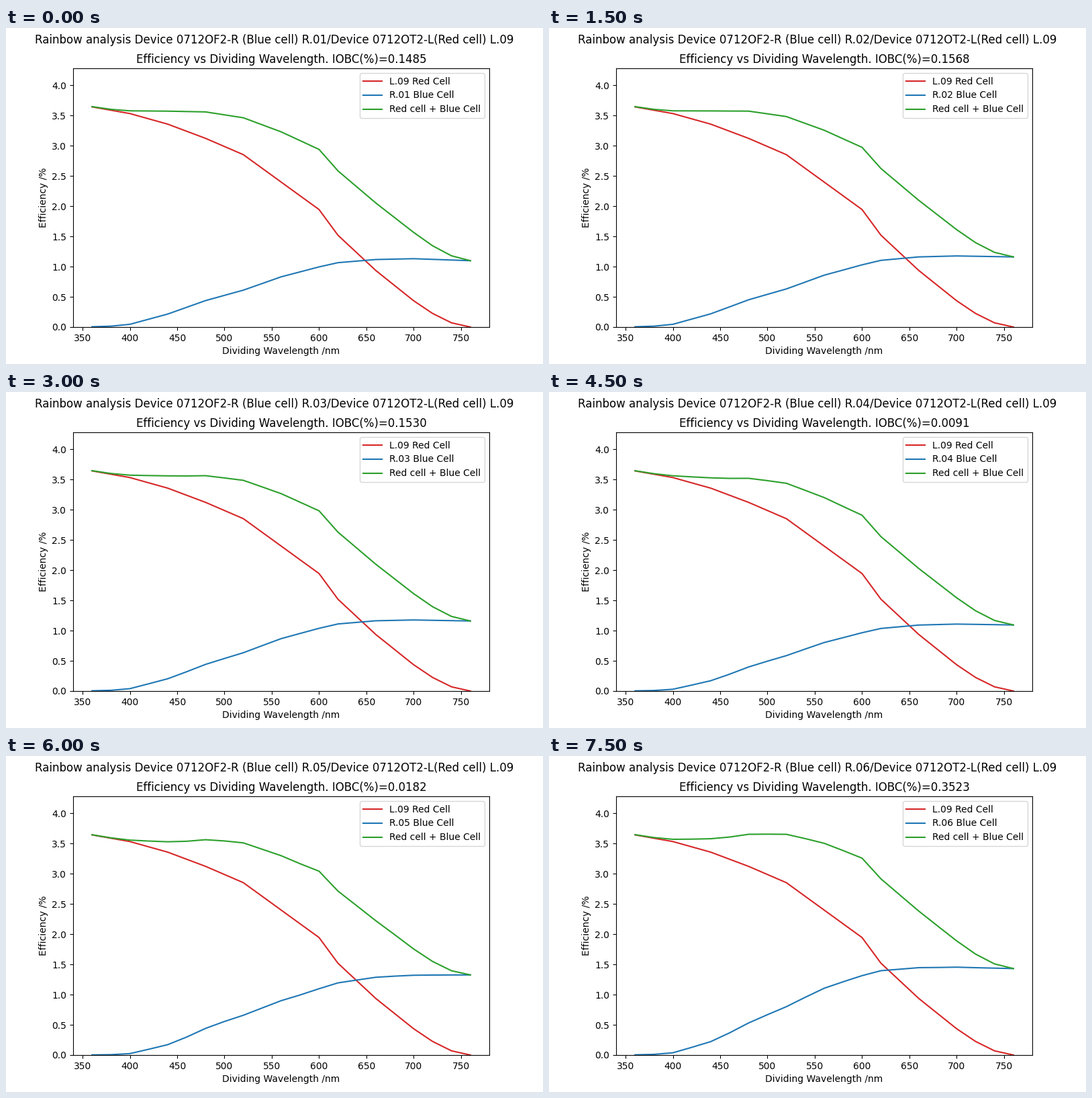
A matplotlib script that plays this animation: 800x500 px, repeating every 8000 ms.

```python
import numpy as np
import matplotlib.pyplot as plt
from matplotlib.animation import FuncAnimation

plt.rcParams["font.family"] = "DejaVu Sans"

STEP_MS = 500
FRAMES = 16
HOLD = 3  # frames each cell stays on screen

wavelength = np.arange(360, 761, 20)


def through(*points):
    """Straight segments through a few (wavelength, value) points."""
    return np.interp(wavelength, *zip(*points))


def bump(centre, width):
    return np.exp(-((wavelength - centre) / width) ** 2 / 2)


red = through((360, 3.64), (400, 3.53), (440, 3.355), (480, 3.12), (520, 2.85),
              (600, 1.943), (620, 1.518), (660, 0.935), (700, 0.435),
              (720, 0.225), (740, 0.07), (760, 0))

# Blue response relative to its peak
rise = through((360, 0.004), (380, 0.013), (400, 0.04), (440, 0.19), (480, 0.387),
               (520, 0.54), (560, 0.735), (600, 0.88), (620, 0.942),
               (660, 0.988), (700, 1), (760, 0.986))
early = bump(450, 35)
middle = bump(575, 55)
tail = through((700, 0), (760, 1))

# IOBC, peak efficiency, then weights of the early, middle and tail parts
cells = [
    (0.1485, 1.130, 0, 0, -0.015),
    (0.1568, 1.176, -0.004, -0.006, 0),
    (0.1530, 1.175, -0.018, 0.003, 0),
    (0.0091, 1.108, -0.037, -0.011, 0),
    (0.0182, 1.325, -0.060, -0.058, 0.014),
    (0.3523, 1.450, -0.040, 0.028, 0),
]


def blue_curve(peak, a, b, c):
    return peak * np.maximum(rise + a * early + b * middle + c * tail, 0)


fig, ax = plt.subplots(figsize=(8, 5), dpi=100)


def draw(frame):
    index = frame // HOLD
    iobc, *shape = cells[index]
    blue = blue_curve(*shape)
    name = f"R.{index + 1:02d}"

    ax.clear()
    ax.plot(wavelength, red, color="tab:red", label="L.09 Red Cell")
    ax.plot(wavelength, blue, color="tab:blue", label=f"{name} Blue Cell")
    ax.plot(wavelength, red + blue, color="tab:green", label="Red cell + Blue Cell")
    ax.set_xlim(340, 780)
    ax.set_ylim(0, 4.278)
    ax.set_xlabel("Dividing Wavelength /nm")
    ax.set_ylabel("Efficiency /%")
    ax.set_title(f"Efficiency vs Dividing Wavelength. IOBC(%)={iobc:.4f}")
    ax.legend(loc="upper right")
    fig.suptitle(f"Rainbow analysis Device 0712OF2-R (Blue cell) {name}"
                 "/Device 0712OT2-L(Red cell) L.09", y=0.982)
    return []


anim = FuncAnimation(fig, draw, frames=FRAMES, init_func=lambda: draw(0),
                     interval=STEP_MS, repeat=True, repeat_delay=0)
plt.show()
```
